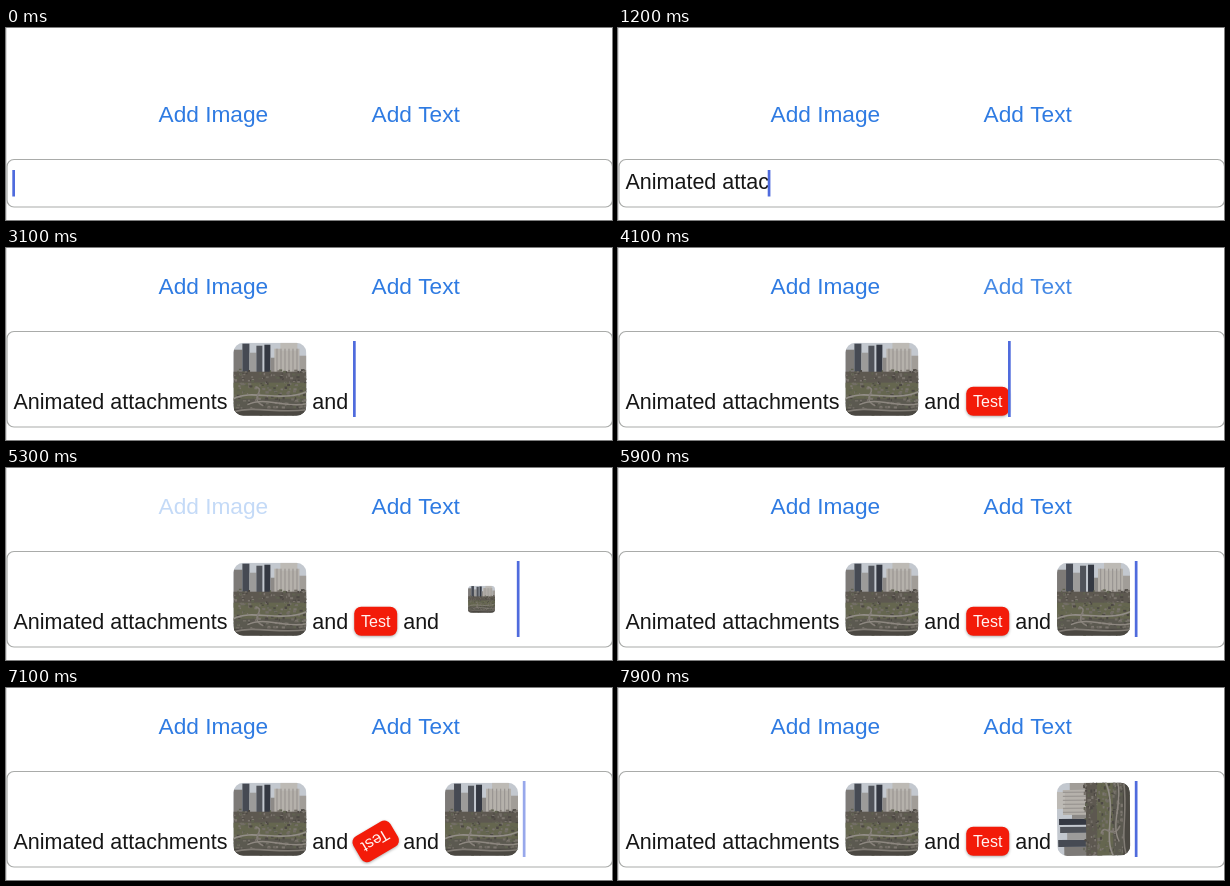
An HTML page with a canvas for the animation above (8 s loop, 606 by 192 pixels).

```html
<!DOCTYPE html>
<html lang="en">
<head>
<meta charset="utf-8">
<title>Animated text attachments</title>
<style>
  html, body { margin: 0; width: 606px; height: 192px; overflow: hidden; background: #fff; }
  canvas { display: block; }
</style>
</head>
<body>
<canvas id="stage" width="606" height="192"></canvas>
<script>
const ctx = document.getElementById('stage').getContext('2d');
const LOOP = 8000, SPIN = 700, GROW = 250, FADE = 500;
const FONT = '"Liberation Sans", Arial, sans-serif';
const BASELINE = 160.5;

// The line of text in reading order; times in ms.
const line = [
  { text: 'Animated attachments ', at: 100, step: 80 },
  { draw: photo, at: 1890, w: 73, y: 131.2, spin: 6117 },
  { text: ' and ', at: 2500, step: 150 },
  { draw: label, at: 3720, w: 43, y: 153.3, spin: 6789 },
  { text: ' and ', at: 4300, step: 140 },
  { draw: photo, at: 5197, w: 73, y: 131.2, spin: 7435 },
  { text: ' ', at: 5800, step: 1 }
];
const buttons = [
  { text: 'Add Image', x: 152.5, taps: [1890, 5197] },
  { text: 'Add Text', x: 365.6, taps: [3720] }
];

const clamp = v => Math.max(0, Math.min(1, v));
const ease = v => (1 - Math.cos(Math.PI * clamp(v))) / 2;

function rect(color, x, y, w, h) {
  ctx.fillStyle = color;
  ctx.fillRect(x, y, w, h);
}

function rounded(x, y, w, h, r) {
  ctx.beginPath();
  ctx.roundRect(x, y, w, h, r);
}

function write(text, x, y, size, color) {
  ctx.font = `${size}px ${FONT}`;
  ctx.fillStyle = color;
  ctx.fillText(text, x, y);
}

function curve(color, width, x, y, ...points) {
  ctx.strokeStyle = color;
  ctx.lineWidth = width;
  ctx.beginPath();
  ctx.moveTo(x, y);
  ctx.bezierCurveTo(...points);
  ctx.stroke();
}

// City park: towers above bare trees, lawn and paths; drawn around 0,0.
function photo() {
  ctx.save();
  rounded(-36.5, -36.5, 73, 73, 10);
  ctx.clip();
  ctx.translate(-36.5, -36.5);
  rect('#c3c8cf', 0, 0, 73, 73);
  rect('#7d7a77', 0, 7, 9, 28);
  rect('#464a53', 9, 1, 7, 31);
  rect('#9c9b9a', 16, 10, 7, 24);
  rect('#50535a', 23, 3, 6, 30);
  rect('#343842', 31, 2, 6, 30);
  rect('#8d8a87', 37, 15, 5, 18);
  rect('#b5b1ab', 41, 6, 25, 27);
  rect('#bdbab5', 47, 0, 17, 8);
  rect('#a19d98', 66, 13, 7, 20);
  for (let x = 43; x < 66; x += 4) rect('#9a9692', x, 6, 1.2, 24);
  rect('#5d5850', 0, 29, 73, 16);
  rect('#65664f', 0, 40, 73, 18);
  rect('#5b5950', 0, 56, 73, 17);
  let seed = 7;
  const random = () => (seed = seed * 16807 % 2147483647) / 2147483647;
  const tones = ['#4c4843', '#736e66', '#5f6150', '#7c766f'];
  for (let i = 0; i < 260; i++) {
    rect(tones[i % 4], random() * 73, 26 + random() * 46, 1 + random() * 2.5, 1 + random() * 1.5);
  }
  curve('#938e88', 1.6, 0, 56, 18, 46, 48, 60, 73, 49);
  curve('#857f78', 1.6, 22, 44, 34, 47, 14, 56, 30, 63);
  curve('#8e8881', 1.4, 14, 62, 32, 53, 52, 66, 73, 61);
  rect('#4b4842', 0, 66, 73, 7);
  curve('#817c75', 1.6, 0, 69, 22, 63, 44, 71, 73, 67);
  ctx.restore();
}

function label() {
  ctx.save();
  ctx.shadowColor = '#0005';
  ctx.shadowBlur = 3;
  ctx.shadowOffsetY = 1;
  ctx.fillStyle = '#f31b09';
  rounded(-21.5, -14.5, 43, 29, 7);
  ctx.fill();
  ctx.restore();
  ctx.textAlign = 'center';
  write('Test', 0, 6, 16, '#fff4f2');
  ctx.textAlign = 'left';
}

function attach(item, x, t) {
  const size = ease((t - item.at) / GROW);
  ctx.save();
  ctx.translate(x + item.w / 2, item.y);
  ctx.rotate(2 * Math.PI * ease((t - item.spin) / SPIN));
  ctx.scale(size, size);
  item.draw();
  ctx.restore();
}

// Buttons dim while pressed and fade back after release.
function buttonAlpha(taps, t) {
  const tap = taps.findLast(at => t >= at - 100);
  return tap === undefined ? 1 : 0.2 + 0.8 * ease((t - tap) / FADE);
}

function render(t) {
  const tall = t >= line[1].at;
  const top = tall ? 83.5 : 131.5;
  rect('#fff', 0, 0, 606, 192);
  rect('#dcdcdc', 0, 0, 1, 192);

  for (const b of buttons) {
    ctx.globalAlpha = buttonAlpha(b.taps, t);
    write(b.text, b.x, top - 38, 22.7, '#2f7be2');
  }
  ctx.globalAlpha = 1;

  ctx.strokeStyle = '#a9aba9';
  ctx.lineWidth = 1.2;
  rounded(1, top, 605.5, 179 - top, 7);
  ctx.stroke();

  let x = 7.5;
  const placed = [];
  for (const item of line) {
    if (t < item.at) break;
    if (item.text) {
      const typed = item.text.slice(0, 1 + Math.floor((t - item.at) / item.step));
      write(typed, x, BASELINE, 21.5, '#161616');
      x += ctx.measureText(typed).width;
    } else {
      placed.push([item, x]);
      x += item.w;
    }
  }
  for (const [item, left] of placed) attach(item, left, t);

  const blink = 0.5 + 1.5 * Math.cos(2 * Math.PI * (t - 6860) / 1000);
  ctx.globalAlpha = t < 5900 ? 1 : clamp(blink);
  rect('#4f6bdd', x - 1.2, tall ? 93 : 142, 2.7, tall ? 76 : 26.5);
  ctx.globalAlpha = 1;
}

function tick() {
  render(performance.now() % LOOP);
  requestAnimationFrame(tick);
}
tick();
</script>
</body>
</html>
```
